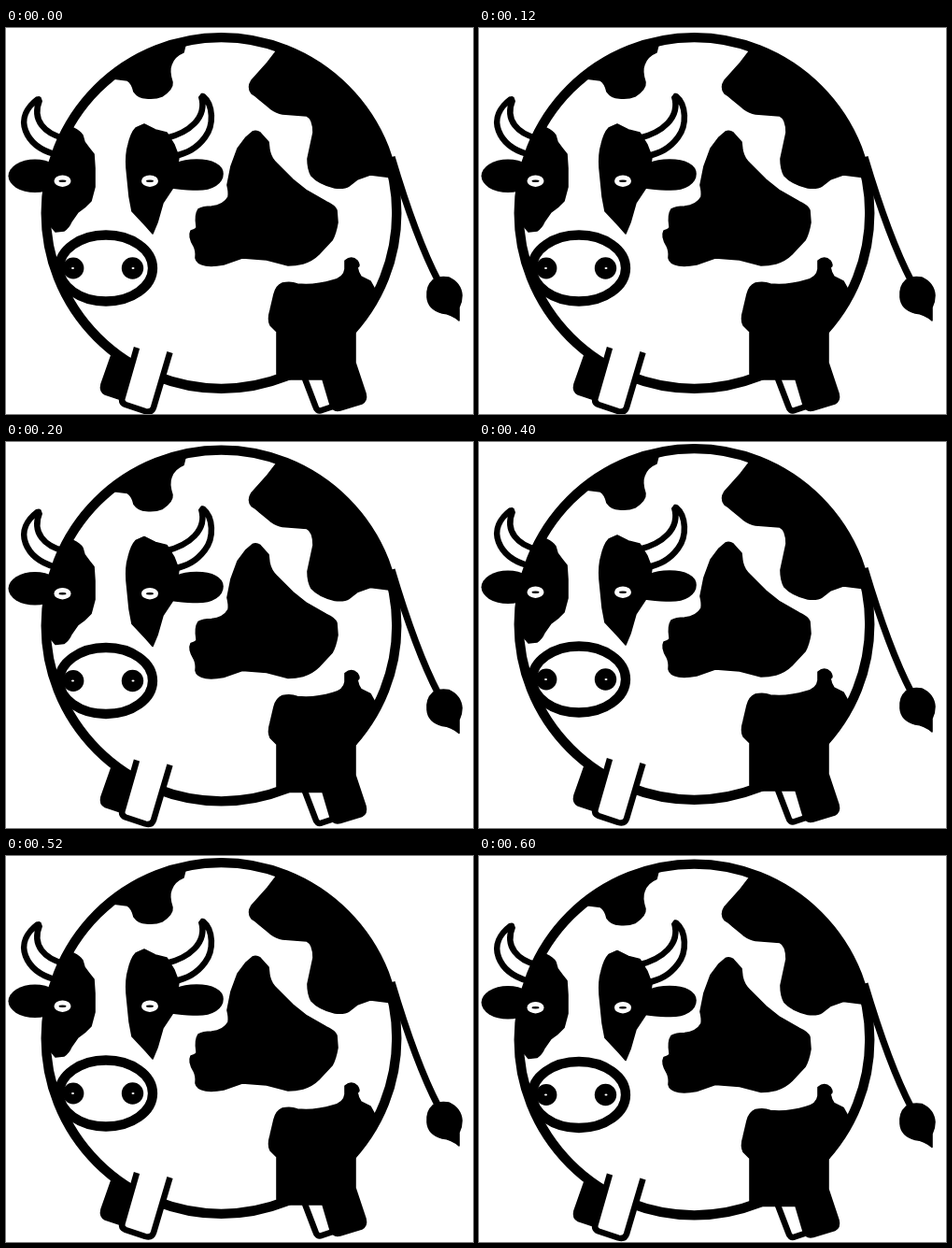
Write an HTML page that moves like this. It is 500x413 px and loops after 0.8 s.

```html
<!DOCTYPE html>
<html lang="en">
<head>
<meta charset="utf-8">
<title>Bobbing cow</title>
<style>
  html, body { margin: 0; width: 100%; height: 100%; overflow: hidden; background: #fff; }
  svg { display: block; width: 500px; height: 413px; }
  .line { fill: #fff; stroke: #000; stroke-width: 6.5; stroke-linejoin: bevel; }
  .thick { stroke-width: 10.3; }
  .patch { stroke: #000; stroke-width: 1.6; stroke-linejoin: round; }
  .tail { fill: none; stroke-width: 7.3; }
  .eye { fill: #fff; }
</style>
</head>
<body>
<svg viewBox="0 0 500 413">
  <g id="cow">
    <!-- tail, left horn and ear, far legs -->
    <path class="line tail" d="M413 138C424 175 441 229 463 271"/>
    <path class="patch" d="M457 270Q464 265 474 267Q487 273 488 286Q488 293 485 299L485 313Q477 306 467 305Q452 301 451 288Q450 276 457 270Z"/>
    <path class="line" d="M62 118C42 113 27 99 36 77L34 76C22 85 16 97 21 110C26 123 38 131 52 135"/>
    <ellipse cx="31" cy="158.3" rx="28.5" ry="17.8"/>
    <path class="patch" d="M115 344L102 381Q100 389 106 392L124 398L138 352Z"/>
    <path class="line" d="M318 370L331 404Q333 411 338 409L353 404L340 370"/>

    <circle class="line thick" cx="230.5" cy="198" r="187.8"/>

    <!-- hide patches -->
    <g class="patch">
      <path d="M290 24L280 37L263 56Q258 64 263 70Q267 72 272 77L283 86Q290 91 296 92L322 94Q329 97 329 112L323 140Q323 151 327 158Q335 167 352 171Q363 172 367 169L376 162L390 157L414 160A188 188 0 0 0 290 20Z"/>
      <path d="M114 54L130 56Q135 59 137 68Q142 75 150 75Q160 76 167 73Q179 65 178 58Q174 46 177 39Q180 30 190 26L193 14A188 188 0 0 0 115 50Z"/>
      <path d="M264 111Q268 109 272 112L281 122L282 131Q284 140 290 145L307 162L322 174L343 186Q352 190 354 195L355 208Q353 220 349 227L335 242Q328 249 318 252Q310 254 302 254L279 248L253 246L233 253Q222 255 214 254Q204 252 203 246Q204 239 201 233Q195 223 198 217Q205 215 204 212Q202 200 206 194Q211 191 220 191Q233 190 238 181Q239 176 237 168L241 148L248 129L257 117Z"/>
      <path d="M363 249Q370 243 376 249Q380 255 376 256Q377 262 380 266L390 271L395 280Q391 294 385 305L374 326V358L385 391Q387 399 381 402L358 409Q350 411 347 403L339 376H295Q291 374 290 370L290 325L283 318Q280 312 283 302L287 285Q289 276 296 273Q305 271 312 274Q330 276 350 270Q362 267 363 258Z"/>
    </g>

    <!-- near leg -->
    <path class="line" d="M140 342L124.5 396Q123 401 128 403L149 410Q156 412 158 406L175.5 347"/>

    <!-- head -->
    <path class="line" d="M171 118C196 112 216 96 209 73L211 73C222 82 223 104 213 117C204 129 194 134 180 137"/>
    <g class="patch">
      <path d="M72 107Q79 110 82 115L84 122Q89 129 94 135L95 150V170L91 185Q85 192 77 197L70 207Q67 214 62 217L53 218L48 212L43 190L54 137Z"/>
      <path d="M148 103L160 109L172 112L180 125L185 138L182 160L178 172L168 187L162 208L157 220L150 212L135 196L132 180L129 150Q128 135 131 125Q134 112 139 107Z"/>
      <path d="M170 157C176 145 190 141 204 141C221 141 232 147 232 156C232 166 221 173 205 173C194 173 187 172 178 171Z"/>
    </g>
    <ellipse class="eye" cx="60.5" cy="163.7" rx="9" ry="6.2"/>
    <ellipse cx="60.5" cy="163.7" rx="4" ry="1.2"/>
    <ellipse class="eye" cx="154" cy="163.7" rx="9" ry="6.2"/>
    <ellipse cx="154" cy="163.7" rx="4" ry="1.2"/>
    <ellipse class="line thick" cx="107" cy="257" rx="50" ry="35.5"/>
    <circle cx="72" cy="257" r="11.4"/>
    <circle cx="135.5" cy="257" r="11.7"/>
    <ellipse class="eye" cx="71.5" cy="257" rx="1.5" ry="1"/>
    <ellipse class="eye" cx="136" cy="257" rx="1.5" ry="1"/>
  </g>
</svg>
<script>
  const cow = document.getElementById('cow');
  const lifts = [0, -1.5, -3, -1.5];
  const stepMs = 200;

  function draw(now) {
    const lift = lifts[Math.floor(now / stepMs) % lifts.length];
    cow.setAttribute('transform', `translate(0 ${lift})`);
    requestAnimationFrame(draw);
  }
  draw(performance.now());
</script>
</body>
</html>
```
